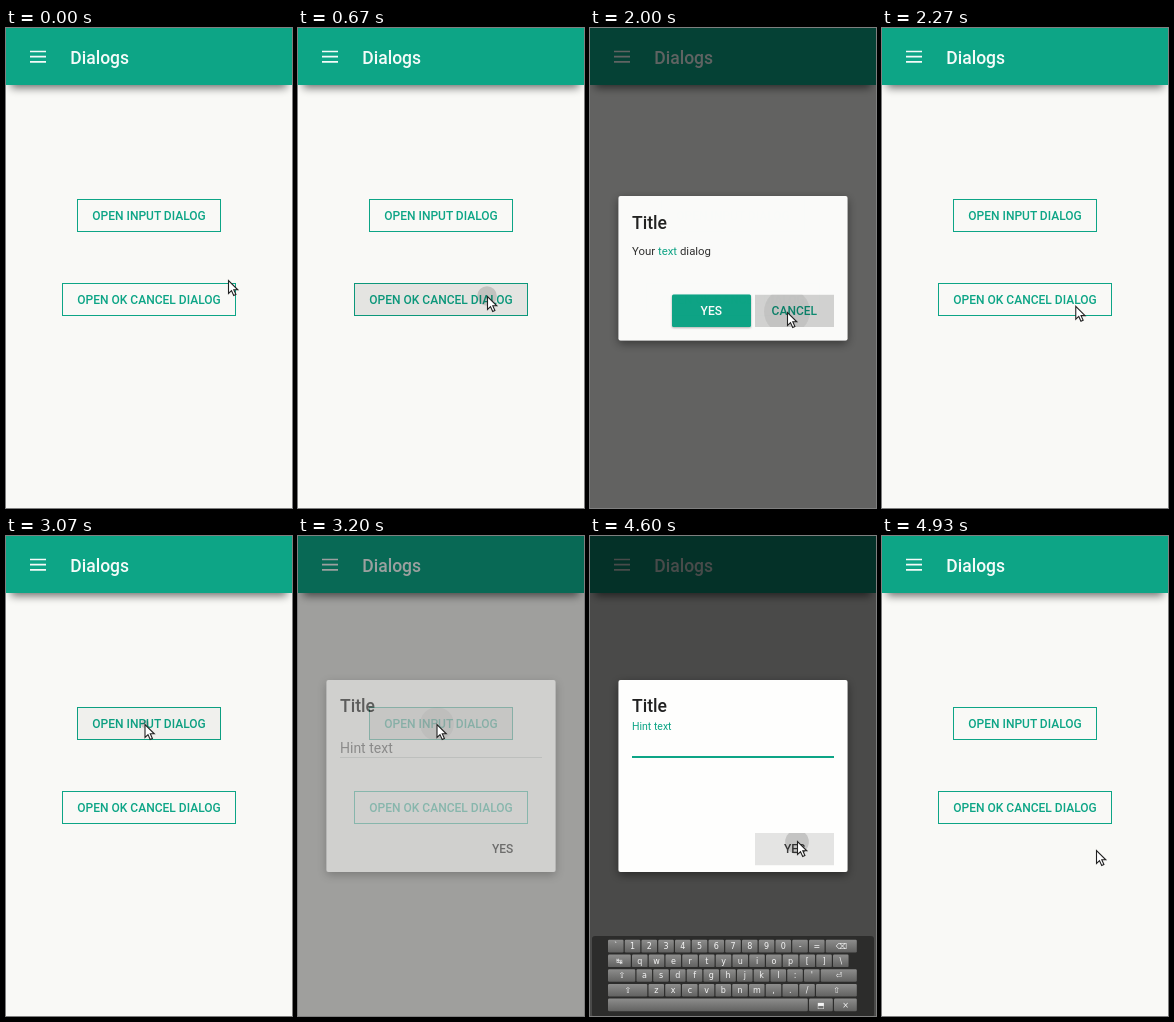
Recreate the animation shown at these times as an HTML page. Size 286 by 480 pixels, loop 5.07 s.

```html
<!DOCTYPE html>
<html lang="en">
<head>
<meta charset="utf-8">
<title>Dialogs</title>
<style>
  html, body { margin: 0; width: 100%; height: 100%; overflow: hidden; background: #f9f9f6; }
  svg { display: block; }
  text { font-family: Roboto, sans-serif; }
  .medium { font-weight: 500; }
  .button { font-size: 12px; font-weight: 500; text-anchor: middle; }
  .heading { font-size: 17.6px; font-weight: 500; fill: #212121; }
  .body { font-size: 11.4px; fill: #303030; }
  .key { font: 8px "DejaVu Sans", sans-serif; fill: #f4f4f4; text-anchor: middle; }
</style>
</head>
<body>
<svg id="stage" width="286" height="480" viewBox="0 0 286 480"></svg>
<script>
const LOOP = 5070, TICK = 1000 / 15, GREEN = '#0da586';

const label = (x, y, text, fill) =>
  `<text class="button" x="${x}" y="${y}" fill="${fill}">${text}</text>`;

const outlined = (x, y, w, text) =>
  `<rect x="${x}" y="${y}" width="${w}" height="32" fill="none" stroke="${GREEN}"/>` +
  label(x + w / 2, y + 20.5, text, GREEN);

// A nested svg clips the ripple to its button.
const ripple = (id, x, y, w, h) => `
  <svg id="${id}" x="${x}" y="${y}" width="${w}" height="${h}">
    <rect width="${w}" height="${h}"/><circle/>
  </svg>`;

const card = (y, h) =>
  `<rect x="28.5" y="${y}" width="229" height="${h}" rx="2" fill="#fefefd" filter="url(#lift)"/>`;

function keyboard() {
  const left = 18, right = 267, pitch = 16.75;
  const key = (x, end, y, text) =>
    `<rect x="${x}" y="${y}" width="${end - x - 1.2}" height="12.6" rx="1.2" fill="url(#keyFill)"/>` +
    `<text class="key" x="${(x + end - 1) / 2}" y="${y + 9.2}">${text}</text>`;
  const rows = [
    [18, '', '`1234567890-=', '⌫'],
    [42, '↹', 'qwertyuiop[]\\', ''],
    [46.5, '⇧', "asdfghjkl:'", '⏎'],
    [58.5, '⇧', 'zxcvbnm,./', '⇧']
  ];
  let out = '<rect x="2" y="400" width="282" height="81" rx="3" fill="#2c2c2b"/>';
  rows.forEach(([start, lead, letters, tail], i) => {
    const y = 403.8 + i * 14.7;
    if (lead) out += key(left, start, y, lead);
    [...letters].forEach((c, n) => out += key(start + n * pitch, start + (n + 1) * pitch, y, c));
    if (tail) out += key(start + letters.length * pitch, right + 1, y, tail);
  });
  const y = 462.6;
  return out + key(left, 219, y, '') + key(219, 244, y, '⬒') + key(244, right + 1, y, '×');
}

document.getElementById('stage').innerHTML = `
  <defs>
    <filter id="soft" x="-10%" y="-50%" width="120%" height="220%"><feGaussianBlur stdDeviation="4"/></filter>
    <filter id="lift" x="-10%" y="-15%" width="120%" height="135%">
      <feDropShadow dx="0" dy="3" stdDeviation="5" flood-opacity=".45"/>
    </filter>
    <filter id="raise" x="-10%" y="-20%" width="120%" height="150%">
      <feDropShadow dx="0" dy="1" stdDeviation="1" flood-opacity=".3"/>
    </filter>
    <linearGradient id="keyFill" x2="0" y2="1">
      <stop stop-color="#8d8d8c"/><stop offset="1" stop-color="#626261"/>
    </linearGradient>
  </defs>
  <rect width="286" height="480" fill="#f9f9f6"/>
  <rect x="5" y="20" width="276" height="40" opacity=".55" filter="url(#soft)"/>
  <rect width="286" height="57" fill="${GREEN}"/>
  <path d="M24 23.5h16M24 28.7h16M24 33.9h16" stroke="#f4fbf9" stroke-width="1.7"/>
  <text class="medium" x="64.3" y="36" font-size="17.5" fill="#f4fbf9">Dialogs</text>
  ${outlined(71.5, 171.5, 143, 'OPEN INPUT DIALOG')}
  ${ripple('inputRipple', 71, 171, 144, 33)}
  ${outlined(56.5, 255.5, 173, 'OPEN OK CANCEL DIALOG')}
  ${ripple('okRipple', 56, 255, 174, 33)}
  <rect id="scrim" width="286" height="480"/>
  <g id="confirm">
    ${card(168, 144.5)}
    <text class="heading" x="42" y="201">Title</text>
    <text class="body" x="42" y="227">Your <tspan fill="${GREEN}">text</tspan> dialog</text>
    <rect x="82" y="266.5" width="79" height="32.5" rx="1.5" fill="${GREEN}" filter="url(#raise)"/>
    ${label(121.3, 287, 'YES', '#fff')}
    ${label(204.3, 287, 'CANCEL', GREEN)}
    ${ripple('cancelRipple', 165, 266.5, 79, 32.5)}
  </g>
  <g id="prompt">
    ${card(144, 192)}
    <text class="heading" x="42" y="175.5">Title</text>
    <text id="hint" x="42">Hint text</text>
    <path d="M42 221.5H244" stroke="#d9dddc"/>
    <path id="line" stroke="${GREEN}" stroke-width="2"/>
    ${label(204.6, 317.3, 'YES', '#404040')}
    ${ripple('yesRipple', 165, 297, 79, 32.5)}
  </g>
  <g id="keyboard">${keyboard()}</g>
  <path id="cursor" d="M.5 .5V13.4L3.5 10.6 5.7 15.4 7.9 14.4 5.8 9.8H9.8Z"
        fill="#fff" stroke="#222" stroke-width="1.1"/>`;

const el = {};
document.querySelectorAll('[id]').forEach(node => el[node.id] = node);

const clamp = v => Math.min(1, Math.max(0, v));
const span = (t, a, b) => clamp((t - a) / (b - a));
const mix = (a, b, p) => a + (b - a) * p;
const smooth = p => p * p * (3 - 2 * p);
const easeOut = p => 1 - (1 - p) ** 2;

const path = [
  [0, 222, 252], [333, 189, 268], [1200, 189, 268], [1267, 188, 271],
  [1533, 197, 284], [2133, 197, 284], [3000, 138.5, 188], [3400, 138.5, 188],
  [3667, 144, 196], [3930, 146, 199], [4470, 207, 305], [4600, 207, 305], [4930, 214, 314]
];

function pointer(t) {
  const i = path.findIndex(k => k[0] > t);
  if (i < 0) return path[path.length - 1].slice(1);
  const [t0, x0, y0] = path[i - 1], [t1, x1, y1] = path[i];
  const p = smooth(span(t, t0, t1));
  return [mix(x0, x1, p), mix(y0, y1, p)];
}

function drawRipple(node, age, x, y) {
  const [wash, circle] = node.children;
  const fade = age > 0 ? 1 - span(age, 350, 470) : 0;
  wash.setAttribute('opacity', fade && fade * .17 * (1 - Math.exp(-age / 100)));
  circle.setAttribute('cx', x);
  circle.setAttribute('cy', y);
  circle.setAttribute('r', 25 * (1 - Math.exp(-Math.max(0, age) / 140)));
  circle.setAttribute('opacity', fade * mix(.15, .07, span(age, 60, 330)));
}

// Returns how far a dialog is shown; the card stays solid longer than the scrim on closing.
function drawDialog(node, t, open, opened, close, closed) {
  const shown = span(t, open, opened), gone = span(t, close, closed);
  node.setAttribute('opacity', shown * (1 - gone ** 2));
  node.setAttribute('display', shown > 0 && gone < 1 ? 'inline' : 'none');
  return shown * (1 - gone);
}

function draw(t) {
  const [x, y] = pointer(t);
  el.cursor.setAttribute('transform', `translate(${x} ${y})`);

  drawRipple(el.okRipple, t - 597, 133, 13);
  drawRipple(el.cancelRipple, t - 1650, 32, 17);
  drawRipple(el.inputRipple, t - 3043, 68, 17);
  drawRipple(el.yesRipple, t - 4510, 42, 9);

  const scrim = drawDialog(el.confirm, t, 750, 930, 1970, 2190) +
                drawDialog(el.prompt, t, 3130, 3265, 4720, 4925);
  el.scrim.setAttribute('opacity', .7 * scrim);

  const floated = easeOut(span(t, 3540, 3800));
  const tint = [[120, 13], [120, 165], [120, 134]].map(([a, b]) => Math.round(mix(a, b, floated)));
  el.hint.setAttribute('y', mix(217, 194, floated));
  el.hint.setAttribute('font-size', mix(14, 10.5, floated));
  el.hint.setAttribute('fill', `rgb(${tint})`);

  const half = 101 * easeOut(span(t, 3540, 3755));
  el.line.setAttribute('d', `M${143 - half} 221H${143 + half}`);
  el.line.setAttribute('display', half ? 'inline' : 'none');

  el.keyboard.setAttribute('opacity', span(t, 3540, 3660) * (1 - span(t, 4780, 4920)));
}

const start = performance.now();
function frame() {
  const t = (performance.now() - start) % LOOP;
  draw(Math.floor((t + 5) / TICK) * TICK);
  requestAnimationFrame(frame);
}
frame();
</script>
</body>
</html>
```
